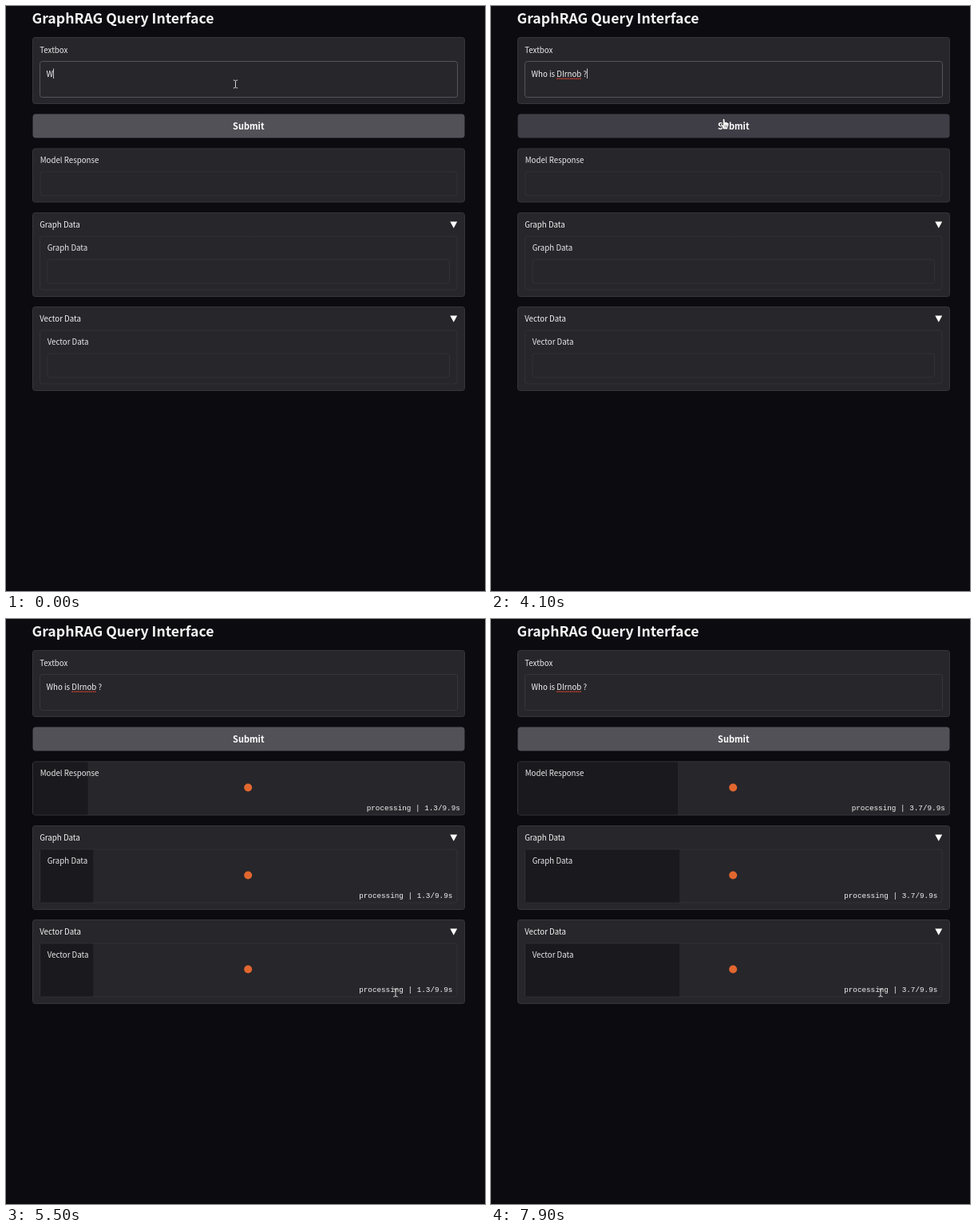
These frames come from a looping animation (600 by 734 pixels, 8 s). An HTML page with a canvas:

```html
<!DOCTYPE html>
<html lang="en">
<head>
<meta charset="utf-8">
<title>Query interface</title>
<style>
  html, body { margin: 0; width: 100%; height: 100%; overflow: hidden; background: #0c0b10; }
  canvas { display: block; }
</style>
</head>
<body>
<canvas id="stage" width="600" height="734"></canvas>
<script>
const ctx = document.getElementById('stage').getContext('2d');
const LOOP = 8000, SUBMIT = 4200, TOTAL = 9.9;
const SANS = '"Noto Sans CJK JP", "Noto Sans CJK SC", "Noto Sans CJK KR", "Noto Sans CJK TC", "Noto Sans CJK", "Noto Sans", sans-serif';
const LABEL = `9.7px ${SANS}`;
const MONO = '9.3px "Liberation Mono", "DejaVu Sans Mono", monospace';
const BLOCK = '#27262a', BORDER = '#37363c', FAINT = '#323136', BAR = '#1a191d';

const WORD = 'DIrnob';
const QUERY = `Who is ${WORD} ?`;
// [time in ms, characters typed]
const TYPING = [[0, 1], [400, 2], [900, 4], [1000, 6], [1100, 8], [1500, 10],
                [1800, 11], [2000, 12], [2200, 13], [2700, 15]];
// [time in ms, x, y, shape]
const POINTER = [[0, 287.5, 98, 'beam'], [4100, 291.5, 141.5, 'hand'], [4300, 345, 232, 'arrow'],
                 [4400, 430, 385, 'arrow'], [4500, 474.8, 449.8, 'arrow'],
                 [4600, 485, 466, 'beam'], [4700, 488, 469, 'beam']];

const latest = (steps, t) => steps.filter(step => step[0] <= t).pop();

function box(x, y, right, bottom, fill, stroke, radius = 3) {
  ctx.beginPath();
  ctx.roundRect(x + 0.5, y + 0.5, right - x - 1, bottom - y - 1, radius);
  ctx.fillStyle = fill;
  ctx.fill();
  if (stroke) {
    ctx.strokeStyle = stroke;
    ctx.lineWidth = 1;
    ctx.stroke();
  }
}

function text(string, x, y, font = LABEL, align = 'left', color = '#ececee') {
  ctx.font = font;
  ctx.textAlign = align;
  ctx.fillStyle = color;
  ctx.fillText(string, x, y);
}

function shape(points, fill, stroke) {
  ctx.beginPath();
  points.forEach(([x, y]) => ctx.lineTo(x, y));
  ctx.closePath();
  if (stroke) {
    ctx.strokeStyle = stroke;
    ctx.lineWidth = 1.4;
    ctx.lineJoin = 'round';
    ctx.stroke();
  }
  ctx.fillStyle = fill;
  ctx.fill();
}

function drawQuery(t) {
  const x = 50.5, baseline = 88.5;
  const typed = QUERY.slice(0, latest(TYPING, t)[1]);
  text(typed, x, baseline, LABEL, 'left', '#f6f6f7');
  const caretX = x + ctx.measureText(typed).width;

  if (t >= 2800) {
    const start = x + ctx.measureText('Who is ').width;
    ctx.strokeStyle = '#c8402f';
    ctx.lineWidth = 1.4;
    ctx.setLineDash([1.6, 0.8]);
    ctx.beginPath();
    ctx.moveTo(start, 91.2);
    ctx.lineTo(start + ctx.measureText(WORD).width, 91.2);
    ctx.stroke();
    ctx.setLineDash([]);
  }
  if (t < 2800 || t === 4100) {
    ctx.fillStyle = '#d8d8dc';
    ctx.fillRect(caretX, 78.5, 0.9, 12.5);
  }
}

function drawButton(t) {
  const mix = t < 4100 ? 1 : Math.min(1, Math.max(0, (t - SUBMIT) / 400));
  const shade = (from, to) => Math.round(from + (to - from) * mix);
  box(33, 135, 575, 166, `rgb(${shade(63, 82)},${shade(62, 81)},${shade(70, 88)})`, null, 4);
  text('Submit', 303.8, 155.2, `bold 11px ${SANS}`, 'center', '#ffffff');
}

// An output field: an empty text area, or a progress cover once submitted.
function drawOutput(label, x, y, right, t, border) {
  const bottom = y + 68;
  box(x, y, right, bottom, BLOCK, border);
  if (t < SUBMIT) {
    box(x + 9.5, y + 29, right - 9.5, y + 60, BLOCK, FAINT);
  } else {
    const seconds = (t - SUBMIT) / 1000;
    const done = Math.max(0, seconds - 0.03) / TOTAL;
    ctx.fillStyle = BAR;
    ctx.fillRect(x + 1, y + 1, Math.max(0, (right - x) * done - 1), bottom - y - 2);
    ctx.beginPath();
    ctx.arc(303.2, y + 33, 5, 0, Math.PI * 2);
    ctx.fillStyle = '#e2672f';
    ctx.fill();
    text(`processing | ${seconds.toFixed(1)}/${TOTAL}s`, right - 6.2, y + 61, MONO, 'right', '#f4f4f5');
  }
  text(label, x + 9.7, y + 18.8);
}

function drawAccordion(label, y, t) {
  box(33, y, 575, y + 106, BLOCK, BORDER);
  text(label, 42.2, y + 19.2, LABEL, 'left', '#f6f6f7');
  shape([[556.3, y + 11.5], [565.2, y + 11.5], [560.75, y + 19.7]], '#ffffff');
  drawOutput(label, 42, y + 29.5, 565.5, t, FAINT);
}

function drawPointer(t) {
  const [, x, y, kind] = latest(POINTER, t);
  ctx.save();
  ctx.translate(x, y);
  if (kind === 'beam') {
    ctx.strokeStyle = '#d0d0d2';
    ctx.lineWidth = 1;
    ctx.beginPath();
    for (const end of [-1, 1]) {
      ctx.moveTo(-2.7, end * 5);
      ctx.quadraticCurveTo(0, end * 5, 0, end * 3.5);
      ctx.quadraticCurveTo(0, end * 5, 2.7, end * 5);
    }
    ctx.moveTo(0, -4);
    ctx.lineTo(0, 4);
    ctx.stroke();
  } else if (kind === 'arrow') {
    shape([[0, 0], [0, 10], [2.3, 8], [4, 11.7], [5.7, 11], [4.1, 7.4], [7.2, 7.2]], '#ffffff', '#111114');
  } else {
    shape([[-1, 0.4], [0, 0], [1, 0.6], [1.4, 4.4], [3, 4], [4.4, 4.9], [5.7, 5.2], [6.3, 6.6],
           [5.8, 9.5], [4.8, 11.2], [4.7, 13], [-0.6, 13], [-1.4, 10.8], [-3.6, 8], [-3.4, 6.8],
           [-2.2, 7], [-0.6, 8.4]], '#f4f4f5', '#1b1a1f');
    ctx.fillStyle = '#55545c';
    for (const fold of [1.2, 2.8, 4.2]) ctx.fillRect(fold, 8, 0.5, 3);
  }
  ctx.restore();
}

function draw(t) {
  ctx.fillStyle = '#0c0b10';
  ctx.fillRect(0, 0, 600, 734);
  text('GraphRAG Query Interface', 32.5, 21.5, `bold 17.7px ${SANS}`, 'left', '#f4f4f5');

  box(33, 39, 575, 123, BLOCK, BORDER);
  text('Textbox', 42.2, 58.8);
  box(42, 69, 566, 115, BLOCK, t < SUBMIT ? '#55545b' : BORDER);
  drawQuery(t);
  drawButton(t);

  drawOutput('Model Response', 33, 178.5, 575, t, BORDER);
  drawAccordion('Graph Data', 259, t);
  drawAccordion('Vector Data', 377, t);
  drawPointer(t);
}

function tick() {
  draw(Math.floor(performance.now() % LOOP / 100) * 100);
  requestAnimationFrame(tick);
}
tick();
</script>
</body>
</html>
```
